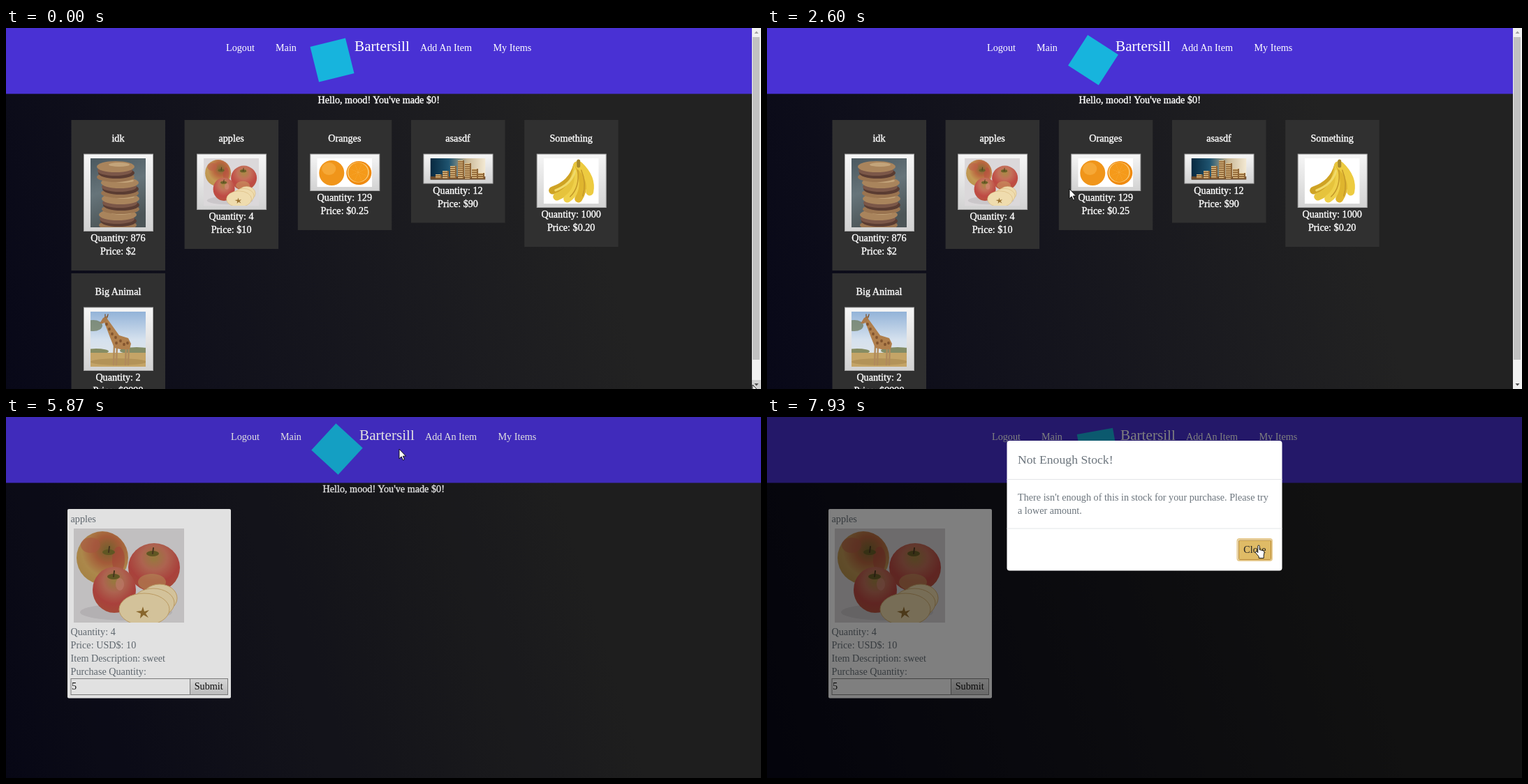
An HTML page for the animation above (8 s loop, 1081 by 518 pixels).

```html
<!DOCTYPE html>
<html lang="en">
<head>
<meta charset="utf-8">
<title>Shop</title>
<style>
  html, body { margin: 0; width: 100%; height: 100%; overflow: hidden; background: #222; }
  #stage { display: block; width: 1081px; height: 518px; background: linear-gradient(73deg, #080818 0%, #222 74%); }
  text { font: 14.2px "Liberation Serif", "Times New Roman", serif; fill: #fff; white-space: pre; }
  .brand { font-size: 21.2px; }
  .heavy text, .heavy { stroke: #fff; stroke-width: .35px; }
  .heavy :not(text) { stroke-width: 1px; }
  .muted text { fill: #6c757d; }
  .muted .title { font-size: 17.7px; }
  .muted .dark { fill: #111; }
</style>
</head>
<body>
<svg id="stage" viewBox="0 0 1081 518"></svg>
<script>
const LOOP = 8000, FPS = 15;
const PAGE_CHANGE = 3130, TYPED = 4730, BACKDROP_IN = 5831, MODAL_IN = 5950, HOVER = 7070, PRESSED = 7860;

const rect = (x, y, w, h, fill, more = '') =>
  `<rect x="${x}" y="${y}" width="${w}" height="${h}" fill="${fill}" ${more}/>`;
const oval = (x, y, rx, ry, fill, more = '') =>
  `<ellipse cx="${x}" cy="${y}" rx="${rx}" ry="${ry}" fill="${fill}" ${more}/>`;
const path = (d, fill, more = '') => `<path d="${d}" fill="${fill}" ${more}/>`;
const curve = (d, color, width) =>
  path(d, 'none', `style="stroke:${color};stroke-width:${width}" stroke-linecap="round"`);
const text = (x, y, s, more = '') => `<text x="${x}" y="${y}" ${more}>${s}</text>`;
const middle = 'text-anchor="middle"';
const group = (content, more = '') => `<g ${more}>${content}</g>`;
const photo = (x, y, w, h, content, box = `0 0 ${w} ${h}`) =>
  `<svg x="${x}" y="${y}" width="${w}" height="${h}" viewBox="${box}" preserveAspectRatio="none" stroke="none">${content}</svg>`;
const gradient = (id, kind, more, ...colors) =>
  `<${kind}Gradient id="${id}" ${more}>${colors.map((c, i) =>
    `<stop offset="${i / (colors.length - 1)}" stop-color="${c}"/>`).join('')}</${kind}Gradient>`;

const defs = `<defs>
  ${gradient('frame', 'linear', 'x2="0" y2="1"', '#f6f6f6', '#d2d2d2')}
  ${gradient('button', 'linear', 'x2="0" y2="1"', '#f2f2f2', '#d4d4d4')}
  ${gradient('apple', 'radial', 'cx=".5" cy=".3" r=".75"', '#a98a45', '#c4705a', '#bf4a44', '#b8553f')}
  ${gradient('ripe', 'radial', 'cx=".6" cy=".35" r=".75"', '#7f6e33', '#b9663f', '#c39a55', '#b8924a')}
  ${gradient('cookieBg', 'linear', 'x2=".3" y2="1"', '#4a585f', '#66747a', '#4c5557')}
  ${gradient('coinBg', 'linear', '', '#06283f', '#1f5470', '#c9b896', '#f4ead4')}
  ${gradient('sky', 'linear', 'x2="0" y2="1"', '#93b3d8', '#d5e1ee', '#e6e8e4')}
</defs>`;

const apples = () =>
  rect(0, 0, 158, 135, '#dbd8da') + oval(75, 120, 66, 12, '#cbc7ca') +
  oval(41, 42, 37, 38, 'url(#ripe)') + oval(24, 24, 14, 11, '#bd5f4a', 'opacity=".6"') +
  oval(64, 45, 9, 19, '#b94d40', 'opacity=".6"') +
  oval(115, 56, 37, 35, 'url(#apple)') + oval(112, 77, 20, 12, '#cba062', 'opacity=".55"') +
  oval(58, 88, 31, 33, 'url(#apple)') + oval(66, 80, 6, 9, '#d98a7c', 'opacity=".6"') +
  [[50, 34], [113, 36], [57, 69]].map(([x, y]) =>
    oval(x, y, 9, 4, '#6d6128') + curve(`M${x} ${y}l1 -8`, '#4e3a20', 2)).join('') +
  [[123, 100, 25, 20], [114, 107, 30, 21], [101, 116, 36, 23]].map(a =>
    oval(...a, '#efdcae', 'style="stroke:#d3ae70;stroke-width:1"')).join('') +
  path('M99 112l2 7 7-2-5 5 4 6-7-4-5 5 1-7-7-3 8-1z', '#9a7332');

// Four sandwiches: two tan biscuits around a brown filling.
function cookies() {
  let s = rect(0, 0, 79, 99, 'url(#cookieBg)');
  for (let i = 3; i >= 0; i--) {
    const x = [36, 42, 43, 39][i], y = 16 + i * 23;
    s += oval(x, y + 11, 27, 7, '#9a7450') + oval(x + 1, y + 5, 26, 8, '#5a3c32') +
      oval(x - 1, y + 2, 25, 7, '#7b5748') + oval(x, y - 4, 27, 8, '#a9845c') +
      oval(x + 5, y - 7, 15, 3, '#c3a47a');
  }
  return s;
}

function oranges() {
  let s = rect(0, 0, 79, 41, '#fff') + oval(21, 21, 18, 18, '#f0951a') +
    oval(17, 15, 10, 9, '#f6a836') + oval(60, 21, 18, 17, '#ef8a10') + oval(59, 20, 15.5, 14.5, '#f9cf80');
  for (let i = 0; i < 8; i++)
    s += path('M0 0L5.5 -13Q0 -15 -5.5 -13Z', '#f59a1a', `transform="translate(59 20) rotate(${i * 45})"`);
  return s;
}

function coins() {
  let s = rect(0, 0, 79, 31, 'url(#coinBg)') + rect(0, 26, 79, 5, '#6b4a2c');
  [[12, 6], [22, 11], [33, 18], [44, 26], [54, 22], [64, 14], [73, 8]].forEach(([x, h]) => {
    s += rect(x - 4.5, 29 - h, 9, h, '#8f6536');
    for (let y = 29 - h; y < 29; y += 3) s += rect(x - 4.5, y, 7, 1.2, '#e2c48c');
  });
  return s;
}

const bananas = () =>
  rect(0, 0, 79, 65, '#fff') +
  curve('M48 10Q41 37 13 46', '#cfa324', 11) + curve('M48 10Q44 46 19 55', '#e6c33c', 11) +
  curve('M49 10Q54 44 34 58', '#efd04a', 11) + curve('M50 10Q63 38 50 58', '#dfb52e', 11) +
  curve('M51 10Q70 28 66 48', '#edcb40', 11) + curve('M45 18Q40 37 17 46', '#f1da6a', 3) +
  curve('M49 17Q52 42 38 55', '#c4982a', 1.5) + curve('M54 17Q62 36 56 54', '#c4982a', 1.5) +
  curve('M50 4l0 7', '#a98a2c', 5);

function giraffe() {
  let s = rect(0, 0, 79, 80, 'url(#sky)') + oval(4, 20, 13, 8, '#6f7b5c', 'opacity=".75"') +
    oval(66, 56, 24, 5, '#838c66') + oval(8, 57, 18, 4, '#868c62') +
    rect(0, 59, 79, 21, '#c4a467') + oval(40, 72, 40, 5, '#b39358');
  s += [34, 38, 51, 55].map(x => curve(`M${x} 48L${x - 1} 76`, '#b08a5c', 2.4)).join('') +
    path('M19 13L23 9 31 20 41 34 54 38 58 46 56 54 43 54 34 52 28 37Z', '#b07f4c') +
    path('M24 6L24 12 18 17 13 17 18 9Z', '#a97a4c') +
    curve('M21 8l0 -4M24 8l1 -4', '#7b5330', 1.3);
  [[23, 18], [27, 25], [31, 32], [36, 37], [37, 45], [43, 42], [48, 47], [53, 45]].forEach(([x, y]) =>
    s += oval(x, y, 1.9, 2.3, '#83552f'));
  return s;
}

function itemCard(x, y, name, height, picture, quantity, price, box) {
  const cx = x + 67, end = y + 61 + height;
  return rect(x, y, 134.5, height + 117, '#303030', 'stroke="none"') + text(cx, y + 31, name, middle) +
    rect(x + 18, y + 49, 99, height + 11.5, 'url(#frame)', 'stroke="#a5a5a5"') +
    photo(x + 27.5, y + 55, 79, height, picture, box) +
    text(cx, end + 14, `Quantity: ${quantity}`, middle) + text(cx, end + 33, `Price: $${price}`, middle);
}

const header = shift => group(
  rect(-20, 0, 1120, 94.5, '#4931d4') +
  rect(-26, -26, 52, 52, '#17b4dd', 'class="mark"') +
  text(315, 33, 'Logout') + text(386, 33, 'Main') + text(499, 33, 'Bartersill', 'class="brand"') +
  text(593, 33, 'Add An Item') + text(697.5, 33, 'My Items') +
  text(533.7, 107.5, "Hello, mood! You've made $0!", middle + ' class="heavy"'), `transform="translate(${shift} 0)"`);

const scrollbar =
  rect(1068, 0, 13, 518, '#f1f1f1') + rect(1069, 13, 10, 463, '#c1c1c1') +
  rect(1068, 505, 13, 13, '#d2d2d2', 'id="downButton"') +
  path('M1071.5 8h6l-3 -3.5z', '#a3a3a3') + path('M1071.5 510h6l-3 3.5z', '#505050');

const listPage = header(0) + group(
  itemCard(93.5, 132, 'idk', 99, cookies(), 876, 2) +
  itemCard(255.6, 132, 'apples', 68, apples(), 4, 10, '0 0 158 135') +
  itemCard(417.8, 132, 'Oranges', 41, oranges(), 129, '0.25') +
  itemCard(580, 132, 'asasdf', 30.5, coins(), 12, 90) +
  itemCard(742.2, 132, 'Something', 65, bananas(), 1000, '0.20') +
  itemCard(93.5, 352, 'Big Animal', 79, giraffe(), 2, 9999), 'class="heavy"') + scrollbar;

const itemPage = header(7) + group(
  rect(88, 132, 234, 271.5, '#fff', 'rx="2"') +
  text(92.5, 150.5, 'apples') + photo(97, 160, 158, 135, apples()) +
  text(92.5, 312.5, 'Quantity: 4') + text(92.5, 331.5, 'Price: USD$: 10') +
  text(92.5, 350.5, 'Item Description: sweet') + text(92.5, 369.5, 'Purchase Quantity:') +
  rect(93, 375.5, 170.5, 23, '#fff', 'stroke="#8a8a8a"') + text(94, 391, 'quantity', 'id="field"') +
  rect(263.5, 375.5, 54, 23, 'url(#button)', 'stroke="#8a8a8a"') +
  text(269.7, 391, 'Submit', 'class="dark"'), 'class="muted"');

// Modal coordinates are relative to its top edge.
const modal =
  rect(343.5, 0, 394, 186.5, '#fff', 'rx="4"') +
  rect(343.5, 55, 394, 1, '#e3e5e8') + rect(343.5, 125.5, 394, 1, '#e3e5e8') +
  text(359, 32.5, 'Not Enough Stock!', 'class="title"') +
  text(359, 85.5, "There isn't enough of this in stock for your purchase. Please try") +
  text(359, 104.5, 'a lower amount.') +
  rect(673.5, 141, 49.5, 31, 'none', 'id="glow" rx="3" stroke="#e6c98d" stroke-width="2"') +
  rect(675.5, 143, 46, 27.5, '#fff', 'id="close" rx="1"') + text(682.3, 161, 'Close', 'id="closeLabel"');

const outline = 'stroke="#000" stroke-width=".9" stroke-linejoin="round"';
const cursors =
  path('M0 0V13.8L3.2 10.8 5.4 15.8 7.5 14.9 5.4 10.1H9.6Z', '#fff', `id="arrow" ${outline}`) +
  path('M-1.2 1.2C-1.2 -.3 1.2 -.3 1.2 1.2V6.4L6.2 7.6Q8.3 8.2 8 10.4L7.2 15V18.5H.2V16.2L-4.4 10.8C-5.3 9.2 -3.6 8 -2.4 9.3L-1.2 10.6Z',
    '#fff', `id="hand" ${outline}`);

const stage = document.getElementById('stage');
stage.innerHTML = defs + group(listPage, 'id="listPage"') + group(itemPage, 'id="itemPage"') +
  rect(0, 0, 1081, 518, '#000', 'id="backdrop"') + group(modal, 'id="modal" class="muted"') +
  group(cursors, 'id="pointer"');

const $ = id => document.getElementById(id);
const show = (el, on) => el.setAttribute('display', on ? 'inline' : 'none');
const marks = [...document.querySelectorAll('.mark')];
const clamp = v => Math.max(0, Math.min(1, v));

// Pointer stops: time, x, y
const stops = [
  [0, 1069, 512], [130, 1069, 512], [870, 331, 228], [1000, 329, 225], [1130, 340, 225],
  [1550, 674, 214], [1800, 611, 218], [2200, 345, 240], [2600, 433, 231], [2900, 336, 232],
  [3130, 325, 245], [3670, 294, 324], [4270, 200, 379], [4870, 200, 379], [5130, 290, 382],
  [5330, 290, 382], [5870, 563, 46], [6130, 601, 48], [6700, 724, 168], [6930, 728, 190],
  [7130, 708, 186], [7400, 704, 185], [8000, 704, 184]
];

function pointerAt(t) {
  const i = Math.max(1, stops.findIndex(s => s[0] > t));
  const [t0, x0, y0] = stops[i - 1], [t1, x1, y1] = stops[i];
  const p = (t - t0) / (t1 - t0), e = p * p * (3 - 2 * p);
  return [x0 + (x1 - x0) * e, y0 + (y1 - y0) * e];
}

function draw(t) {
  const onList = t < PAGE_CHANGE;
  show($('listPage'), onList);
  show($('itemPage'), !onList);
  show($('downButton'), t < 200);

  const angle = (onList ? 211 : 252) + t * .018 + 45;
  marks.forEach(m => m.setAttribute('transform', `translate(467 46) rotate(${angle})`));

  const field = $('field');
  field.textContent = t < TYPED ? 'quantity' : '5';
  field.style.fill = t < TYPED ? '#757575' : '#111';

  $('backdrop').setAttribute('opacity', .5 * clamp((t - BACKDROP_IN) / 150));
  const rest = (1 - clamp((t - MODAL_IN) / 300)) ** 1.75;
  $('modal').setAttribute('transform', `translate(0 ${34 - 50 * rest})`);
  $('modal').setAttribute('opacity', clamp((t - MODAL_IN) / 150));

  const hover = t >= HOVER, close = $('close');
  close.setAttribute('fill', hover ? '#dfbb66' : '#fff');
  close.setAttribute('stroke', hover ? '#b98a35' : '#4931d4');
  $('closeLabel').style.fill = hover ? '#222' : '#4931d4';
  show($('glow'), t >= PRESSED);

  const [x, y] = pointerAt(t);
  const overThumb = onList && y > 181 && y < 261 &&
    [273, 435, 597].some(left => x > left && x < left + 99);
  show($('hand'), overThumb || hover);
  show($('arrow'), !overThumb && !hover);
  $('pointer').setAttribute('transform', `translate(${x} ${y})`);
}

const start = performance.now();
function tick() {
  const t = (performance.now() - start) % LOOP;
  draw(Math.min(Math.floor((t + 5) * FPS / 1000) * 1000 / FPS, LOOP - 1));
  requestAnimationFrame(tick);
}
draw(0);
requestAnimationFrame(tick);
</script>
</body>
</html>
```
